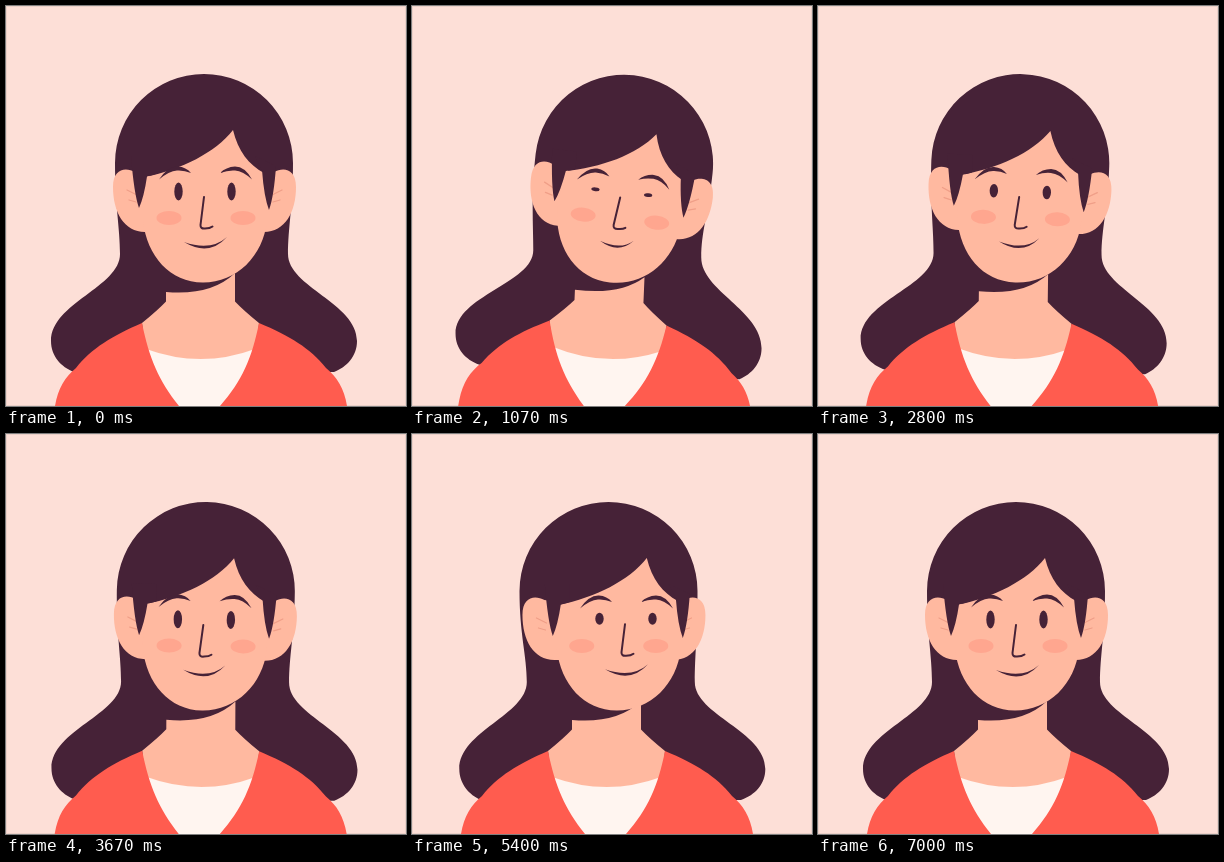
Recreate the animation shown at these times as an HTML page. Size 400x400 px, loop 7.07 s.

```html
<!DOCTYPE html>
<html lang="en">
<head>
<meta charset="utf-8">
<title>Portrait</title>
<style>
  html, body { margin: 0; width: 100%; height: 100%; overflow: hidden; background: #fddfd7; }
  svg { display: block; width: 100vw; height: 100vh; }
  .hair { fill: #462237; }
  .skin { fill: #ffb9a0; }
  .blush { fill: #ffa68f; }
  .knit { fill: #ff5c4f; }
  .shirt { fill: #fff5f0; }
  .line { fill: none; stroke: #462237; stroke-width: 2; stroke-linecap: round; stroke-linejoin: round; }
  .crease { fill: none; stroke: #f09f88; stroke-width: 1.3; stroke-linecap: round; }
</style>
</head>
<body>
<svg viewBox="0 0 400 400">
  <rect width="400" height="400" fill="#fddfd7"/>
  <rect x=".5" y=".5" width="399" height="399" fill="none" stroke="#ebd0c8"/>
  <path id="mane" class="hair"/>
  <g id="body">
    <path id="neck" class="skin"/>
    <path class="shirt" d="M140 343Q195 363 249 343L222 415H166Z"/>
    <path class="knit" d="M47 415L49 400C52 382 59 371 70 362C86 342 106 330 136 317C143 352 153 375 173 400L184 415Z"/>
    <path class="knit" d="M343 415L341 400C338 382 331 371 320 362C304 342 284 330 253 317C246 352 236 375 214 400L203 415Z"/>
  </g>
  <g id="head">
    <g id="ears">
      <path class="skin" d="M143 168L129 166C120 161 107 162 107 181C107 206 118 226 139 226H150Z"/>
      <path class="skin" d="M254 168L268 166C277 161 290 162 290 181C290 206 279 226 258 226H247Z"/>
      <path class="crease" d="M121 184L131 189M123 194L130 196M276 184L266 189M274 194L267 196"/>
    </g>
    <g id="face">
      <path class="skin" d="M139 171C176 163 209 147 227 124C232 145 243 159 258 167L261 205V215C257 250 231 276.500 197 276.500C164 276.500 141 250 137 215V200Z"/>
      <path class="hair" d="M125 150Q128 188 133 202Q138 191 141 170.500L150 168V150Z"/>
      <path class="hair" d="M249 150L256 164Q258 191 263 204Q268 190 270 160Z"/>
    </g>
    <g id="blush">
      <ellipse class="blush" cx="163" cy="212" rx="12.500" ry="7"/>
      <ellipse class="blush" cx="237" cy="212" rx="12.500" ry="7"/>
    </g>
    <g id="features">
      <g id="brows">
        <path class="hair" d="M153 173.500Q162 160 172 160.500Q180 161 185 167Q178 164 171 164.500Q163 165 153 173.500Z"/>
        <path class="hair" d="M246 173.500Q239 160.500 229 160.500Q220 161 214 167Q222 164 229 164.500Q237 165 246 173.500Z"/>
      </g>
      <ellipse class="hair eye" cx="172.500" cy="185.500" rx="4.200"/>
      <ellipse class="hair eye" cx="225.500" cy="185.500" rx="4.200"/>
      <path class="line" d="M198 191L194.500 219Q194.300 223 199 222.500Q204 222.500 206.500 220.500"/>
      <path id="mouth" class="hair" d="M178 236Q203 251 221 231Q205 245.500 178 236Z"/>
    </g>
  </g>
</svg>
<script>
const FRAME = 7070 / 106, CYCLE = 3535;

// [time, value] keys; the choreography runs twice per loop
const KEYS = {
  tilt: [[0, 0], [660, 6.9], [780, 6.9], [1070, 6.3], [1450, 2.5], [1780, 0], [2300, 0], [2560, 2.8], [2800, 1.5], [3080, 0], [CYCLE, 0]],
  turn: [[0, 0], [620, -16], [800, -16], [1070, 0], [1400, 15], [2270, 15], [2700, 0], [CYCLE, 0]],
  sway: [[0, 0], [735, 5.5], [1070, -1.5], [1500, -7], [1900, 4], [2360, -4], [2800, -2], [3200, 0], [CYCLE, 0]],
  eye: [[0, 9], [735, 8.5], [930, 8], [1050, 1.9], [1090, 1.9], [1260, 6], [2300, 6], [2800, 7], [3200, 9], [CYCLE, 9]]
};

const $ = id => document.getElementById(id);
const eyes = document.querySelectorAll('.eye');

// Cubic interpolation without overshoot
function sample(keys, t) {
  const slope = i => (keys[i + 1][1] - keys[i][1]) / (keys[i + 1][0] - keys[i][0]);
  const tangent = i => {
    if (i < 1 || i > keys.length - 2) return 0;
    const a = slope(i - 1), b = slope(i);
    return a * b > 0 ? 2 * a * b / (a + b) : 0;
  };
  let i = 0;
  while (i < keys.length - 2 && t >= keys[i + 1][0]) i++;
  const [t0, a] = keys[i], [t1, b] = keys[i + 1];
  const d = t1 - t0, u = (t - t0) / d, v = 1 - u;
  return a * v * v * (1 + 2 * u) + b * u * u * (3 - 2 * u)
    + d * u * v * (tangent(i) * v - tangent(i + 1) * u);
}

const move = (id, x, y = 0) => $(id).setAttribute('transform', `translate(${x} ${y})`);

function drawMane(tilt, turn, sway, k) {
  const r = tilt * Math.PI / 180, c = Math.cos(r), s = Math.sin(r);
  const spin = (x, y) => [198 + x * c - (y - 285) * s - turn * .1, 285 + x * s + (y - 285) * c];
  const waist = 8.5 * k + .35 * sway;
  // Mirrored strand; side is -1 for left, 1 for right
  const strand = side => {
    const drop = side * 8 * k;
    const at = (x, y, dx, dy) => [198 + side * x + dx, y + dy];
    return [
      spin(side * 89, 157), spin(side * 89, 200),
      at(84, 222, waist, drop * .5), at(84, 248, waist, drop * .5),
      at(84, 281, waist, drop * .5), at(153, 297, sway, drop), at(153, 335, sway, drop),
      at(153, 350, sway, drop), at(143, 361, sway, drop), at(130, 366, sway * .4, drop)
    ];
  };
  const L = strand(-1), R = strand(1).reverse();
  $('mane').setAttribute('d',
    `M${L[0]}C${L.slice(1).join(' ')}L${R[0]}C${R.slice(1).join(' ')}A89 89 0 0 0 ${L[0]}Z`);
}

function drawBody(k) {
  $('body').setAttribute('transform', `rotate(${2.6 * k} 195 355)`);
  $('neck').setAttribute('d',
    `M160 ${286 - k}Q205 ${290 - k} 229 ${267 + 3 * k}V295.500Q237 304 253 317L250 350V400H140V350L136 317Q152 304 160 295.500Z`);
}

function draw(now) {
  const t = Math.floor(now / FRAME) * FRAME % CYCLE;
  const tilt = sample(KEYS.tilt, t), turn = sample(KEYS.turn, t), open = sample(KEYS.eye, t);
  const k = tilt / 6.9;
  drawMane(tilt, turn, sample(KEYS.sway, t), k);
  drawBody(k);
  $('head').setAttribute('transform', `rotate(${tilt} 198 285)`);
  move('ears', turn * .23);
  move('face', turn * .52);
  move('blush', turn * .45);
  move('features', turn, turn * -.05);
  move('brows', 0, (9 - open) * .6);
  $('mouth').setAttribute('transform', `translate(199.5 237) scale(${1 - .24 * k}) translate(-199.5 -237)`);
  eyes.forEach(e => e.setAttribute('ry', open));
}

const start = performance.now();
function loop() {
  draw(performance.now() - start);
  requestAnimationFrame(loop);
}
loop();
</script>
</body>
</html>
```
